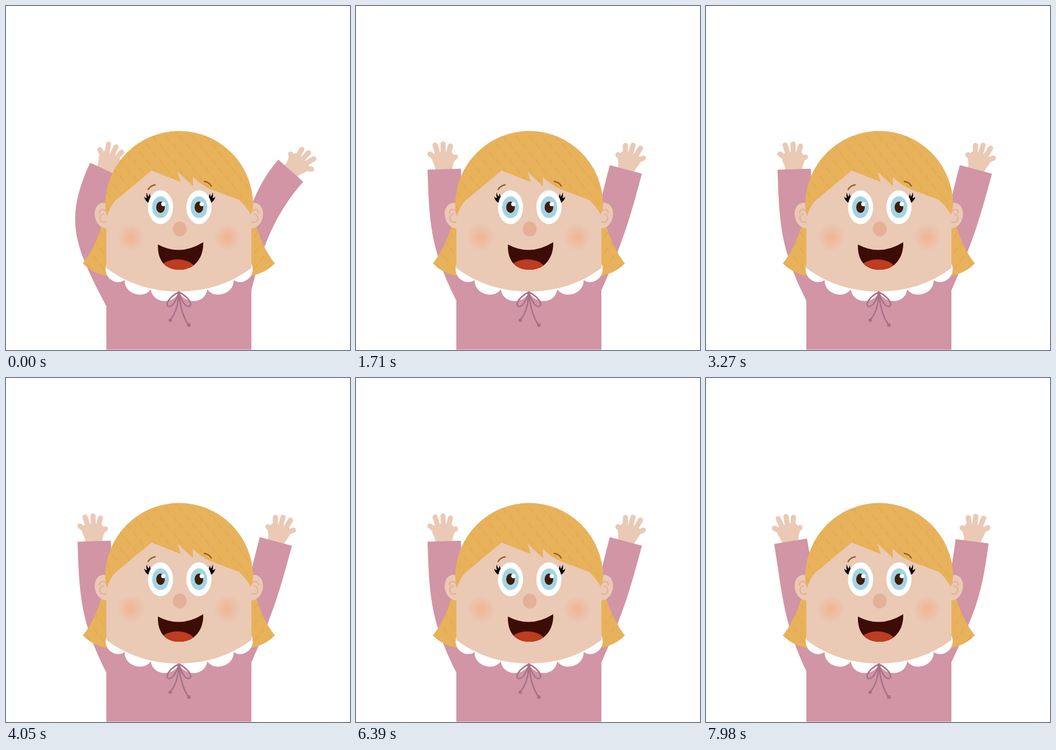
Write an HTML page that moves like this. It is 600 by 600 pixels and loops after 8 s.

```html
<!DOCTYPE html>
<html lang="en">
<head>
<meta charset="utf-8">
<title>Waving girl</title>
<style>
  html, body { margin: 0; width: 100%; height: 100%; overflow: hidden; background: #fff; }
  svg { display: block; width: 100%; height: 100%; }
  .sleeve { fill: #d195a5; }
  .skin { fill: #eac9b5; }
  .hair { fill: url(#strands); }
  .line { fill: none; stroke-linecap: round; stroke-linejoin: round; }
</style>
</head>
<body>
<svg viewBox="0 0 600 600">
  <defs>
    <pattern id="strands" width="23" height="28" patternUnits="userSpaceOnUse">
      <rect width="23" height="28" fill="#e8b25a"/>
      <path d="M3 2l6 9M15 16l6 9" stroke="#e1aa53" stroke-width="1.6" stroke-linecap="round"/>
    </pattern>
    <radialGradient id="blush">
      <stop offset=".1" stop-color="#f1b597"/>
      <stop offset="1" stop-color="#f1b597" stop-opacity="0"/>
    </radialGradient>
    <clipPath id="mouth">
      <path id="lips" d="M265 416Q304 437 344 412C345 438 330 460 303 460C276 460 264 442 265 416Z"/>
    </clipPath>
    <g id="hand" class="skin">
      <path d="M-14 9Q-13 -3 -19 -13Q-20 -27 -12 -30H13Q22 -26 19 -14Q14 -4 15 9Z"/>
      <path class="line" stroke="#eac9b5" stroke-width="9"
        d="M-8 -13L-21 -20M-8 -22L-13.5 -39.5M0 -22L-1 -44M8 -22L13 -43M10 -17L23 -28"/>
    </g>
    <g id="ear">
      <ellipse class="skin" cx="172" cy="365.500" rx="17" ry="22.500" transform="rotate(-14 172 365.500)"/>
      <path class="line" stroke="#e5b098" stroke-width="2.200"
        d="M163 361C163 352 174 353 177 363C180 374 175 378 169 377C162 375 162 363 170 363"/>
    </g>
    <path id="lock" class="hair" d="M168 378Q157 420 134 449Q152 467 178 471V378Z"/>
    <g id="eye">
      <ellipse rx="22" ry="29.500" fill="#fff"/>
      <ellipse rx="14.500" ry="19" fill="#a3d3e3"/>
      <ellipse rx="7.500" ry="10" fill="#401d08"/>
      <circle cx="5" cy="-5.500" r="3.800" fill="#fff"/>
    </g>
    <path id="lashes" d="M255 338Q252 334 250.500 327Q249 331 249.500 333Q246 330 245.500 325Q244 331 246 335Q243 335 241 332.500Q242 339 248 343Z"/>
    <path id="loop" class="line" d="M301.500 499C293 503 283 511 281 519C280 527 289 525 293 518Q299 510 301.500 499"/>
  </defs>

  <g id="leftArm" transform="matrix(-1 0 0 1 613.200 0)">
    <use href="#hand"/><path class="sleeve"/>
  </g>
  <g id="rightArm">
    <use href="#hand"/><path class="sleeve"/>
  </g>

  <use href="#lock"/>
  <use href="#lock" transform="matrix(-1 0 0 1 603 0)"/>
  <path class="sleeve" d="M175 440H428V599.500H175Z"/>
  <path fill="#fff" d="M176 449C166 473 192 489 207 478C206 503 241 512 252.500 494C256 520 292 521 302 499
    C312 521 348 520 351 494C363 512 398 503 397 478C412 489 438 473 428 449Z"/>

  <use href="#ear"/>
  <use href="#ear" transform="matrix(-1 0 0 1 603 0)"/>
  <path class="skin" d="M175 366L190 335L254 280L400 310L428 360V457Q373 498 302 498Q230 498 175 457Z"/>
  <path class="hair" d="M176 367Q173 357 173 347A129 129 0 0 1 431 347
    Q430 356 427 364Q417 347 406 338L358 320Q339 312 326 298V314L299 289L305 307L254 287L190 340Q181 350 176 367Z"/>

  <circle cx="218" cy="403" r="24" fill="url(#blush)"/>
  <circle cx="386" cy="403" r="24" fill="url(#blush)"/>
  <use href="#lashes"/>
  <use href="#lashes" transform="matrix(-1 0 0 1 606 0)"/>
  <use href="#eye" x="269.500" y="351"/>
  <use href="#eye" x="336.500" y="351"/>
  <path class="line" stroke="#8f6428" stroke-width="2.500" d="M248 320Q252 313 260 312M346 306Q354 307 358 314"/>
  <ellipse cx="303" cy="389" rx="12" ry="13" fill="#e5b098"/>
  <use href="#lips" fill="#3b0d04"/>
  <ellipse cx="299" cy="457" rx="29" ry="15" fill="#be3c20" clip-path="url(#mouth)"/>

  <g fill="#a8718a" stroke="#a8718a" stroke-width="2.500">
    <use href="#loop"/>
    <use href="#loop" transform="matrix(-1 0 0 1 603 0)"/>
    <path class="line" d="M301.500 499Q301 530 287 547M301.500 499Q304 535 318 556"/>
    <circle cx="286.500" cy="548" r="1.800"/>
    <circle cx="319" cy="556.500" r="2"/>
  </g>
</svg>
<script>
const LOOP = 8000, STEP = 30, PERIOD = 780, SWING = 31.2;
const leftArm = document.getElementById('leftArm');
const rightArm = document.getElementById('rightArm');

// Point reached from p by going `across` and `down` in axes tilted clockwise by deg.
function offset([x, y], deg, across, down) {
  const a = deg * Math.PI / 180, c = Math.cos(a), s = Math.sin(a);
  return [x + across * c - down * s, y + across * s + down * c];
}

// tilt: outward lean of the cuff in degrees; base: where the sleeve leaves the body.
function poseArm(arm, tilt, base) {
  const wrist = [458 + 0.8 * tilt + 0.0032 * tilt ** 2, 284.6 + 0.0015 * tilt ** 2];
  const shoulderTilt = 26.5 - 0.13 * tilt - 0.0042 * tilt ** 2;
  const bend = 100 - 0.6 * tilt;
  const outer = offset(wrist, tilt, 29, 0);
  const inner = offset(wrist, tilt, -29, 0);
  const points = [
    'M', base,
    'C', offset(base, shoulderTilt, 0, -bend), offset(outer, tilt, 0, bend), outer,
    'L', inner,
    'Q', offset(inner, tilt, 0, 90), [400, 470],
    'L', [400, 540], base, 'Z'
  ];
  arm.querySelector('path').setAttribute('d', points.join(' '));
  arm.querySelector('use').setAttribute('transform',
    `translate(${wrist}) rotate(${1.06 * tilt + 2})`);
}

function draw(now) {
  const t = Math.floor(now % LOOP / STEP) * STEP;
  const sway = SWING * Math.cos(2 * Math.PI * (t + 30) / PERIOD);
  const leftTilt = 5.5 - sway;
  poseArm(leftArm, leftTilt, [438.2, 514.5 - 0.38 * leftTilt]);
  poseArm(rightArm, 11.2 + sway, [428, 496]);
}

const start = performance.now();
function tick() {
  draw(performance.now() - start);
  requestAnimationFrame(tick);
}
tick();
</script>
</body>
</html>
```
